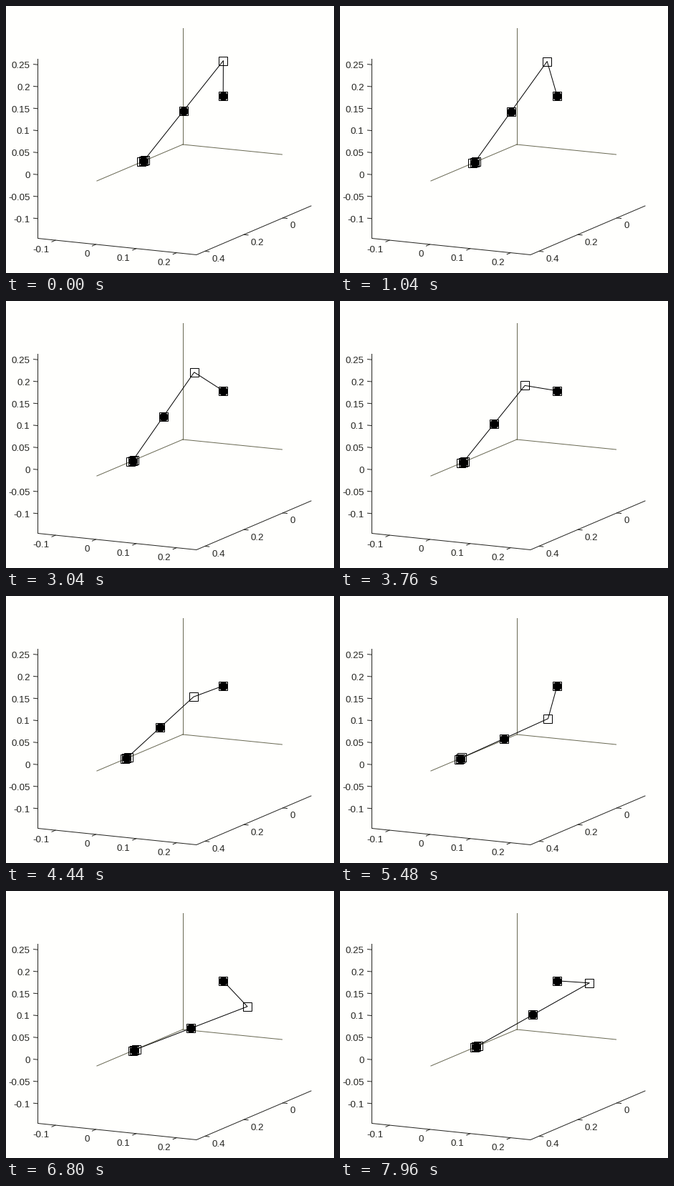
A matplotlib script for the animation above (8000 ms loop, 458 by 374 pixels).

```python
import numpy as np
import matplotlib.pyplot as plt
from matplotlib.animation import FuncAnimation

W, H, DPI = 458, 374, 100
FRAMES, STEP = 200, 40
PX = 72 / DPI  # one pixel in points
INK, FAINT = "#262622", "#6a6a54"

# Orthographic projection: pixel position of the origin and pixels per unit
ORIGIN = np.array([246.8, 194.0])
BASIS = np.array([[-275, 117], [564, 57], [0, -615.7]])

# Spatial slider-crank
CENTRE = np.array([0, 0.1, 0.12])
CRANK, ROD = 0.08, 0.3
HALF_SLIDER = np.array([0.009, 0, 0])

# Crank turns fastest at FAST_ANGLE, reached at FAST_TIME
PERIOD, FAST_TIME, FAST_ANGLE, SWING = 12.2, 5.64, 261.9, 1.75


def project(*points):
    return ORIGIN + np.array(points, float) @ BASIS


def crank_angle(t):
    phase = np.tan(np.pi * (t - FAST_TIME) / PERIOD)
    return np.radians(FAST_ANGLE) + 2 * np.arctan(SWING * phase)


plt.rcParams["font.family"] = "Liberation Sans"
fig = plt.figure(figsize=(W / DPI, H / DPI), dpi=DPI, facecolor="#fffffd")
ax = fig.add_axes([0, 0, 1, 1])
ax.set_xlim(0, W)
ax.set_ylim(H, 0)
ax.axis("off")


def line(points, color=INK, z=1):
    return ax.plot(*np.transpose(points), color=color, lw=PX, zorder=z)[0]


def scale(values, zero, unit, tick, offset, ha):
    """Ticks and labels along an axis; unit is the pixel step per 1.0."""
    for v in values:
        p = np.array(zero) + v * np.array(unit)
        line([p, p + tick])
        x, y = p + offset
        ax.text(x, y + 4.5, f"{v:.2f}".rstrip("0").rstrip(".") if v else "0",
                ha=ha, va="baseline", color=INK, fontsize=13.33 * PX)


# Outer axes
line([(44.5, 74.5), (44.5, 325.5), (266, 348.5), (426, 280)])
scale(np.arange(-2, 6) / 20, (44.5, 236.2), (0, -616),
      (-6, -0.6), (-11, 0.3), "right")
scale(np.arange(-1, 3) / 10, (125.4, 333.9), (564, 58.4),
      (-5, 2.2), (-8.7, 12.8), "right")
scale(np.arange(0, 5, 2) / 10, (386.5, 296.9), (-272, 116.5),
      (6, 0.6), (9.8, 10), "left")

# Axes through the origin
for end in np.diag([0.436, 0.246, 0.265]):
    line(project((0, 0, 0), end), FAINT)

# Moving parts
links = line([(0, 0)], "black", z=3)
discs, = ax.plot([], [], "o", ms=12 * PX, mfc="black", mec="black",
                 mew=0.5 * PX, zorder=4)
squares, = ax.plot([], [], "s", ms=12 * PX, mfc="none", mec="black",
                   mew=PX, zorder=5)


def draw(i):
    a = crank_angle(i * STEP / 1000)
    pin = CENTRE + CRANK * np.array([0, np.cos(a), np.sin(a)])
    slider = np.array([np.sqrt(ROD ** 2 - pin @ pin), 0, 0])
    middle = (pin + slider) / 2
    links.set_data(*project(CENTRE, pin, slider).T)
    discs.set_data(*project(CENTRE, middle, slider).T)
    squares.set_data(*project(CENTRE, pin, middle, slider,
                              slider - HALF_SLIDER,
                              slider + HALF_SLIDER).T)
    return links, discs, squares


anim = FuncAnimation(fig, draw, frames=FRAMES, interval=STEP,
                     init_func=lambda: draw(0), repeat=True, repeat_delay=0)
plt.show()
```
